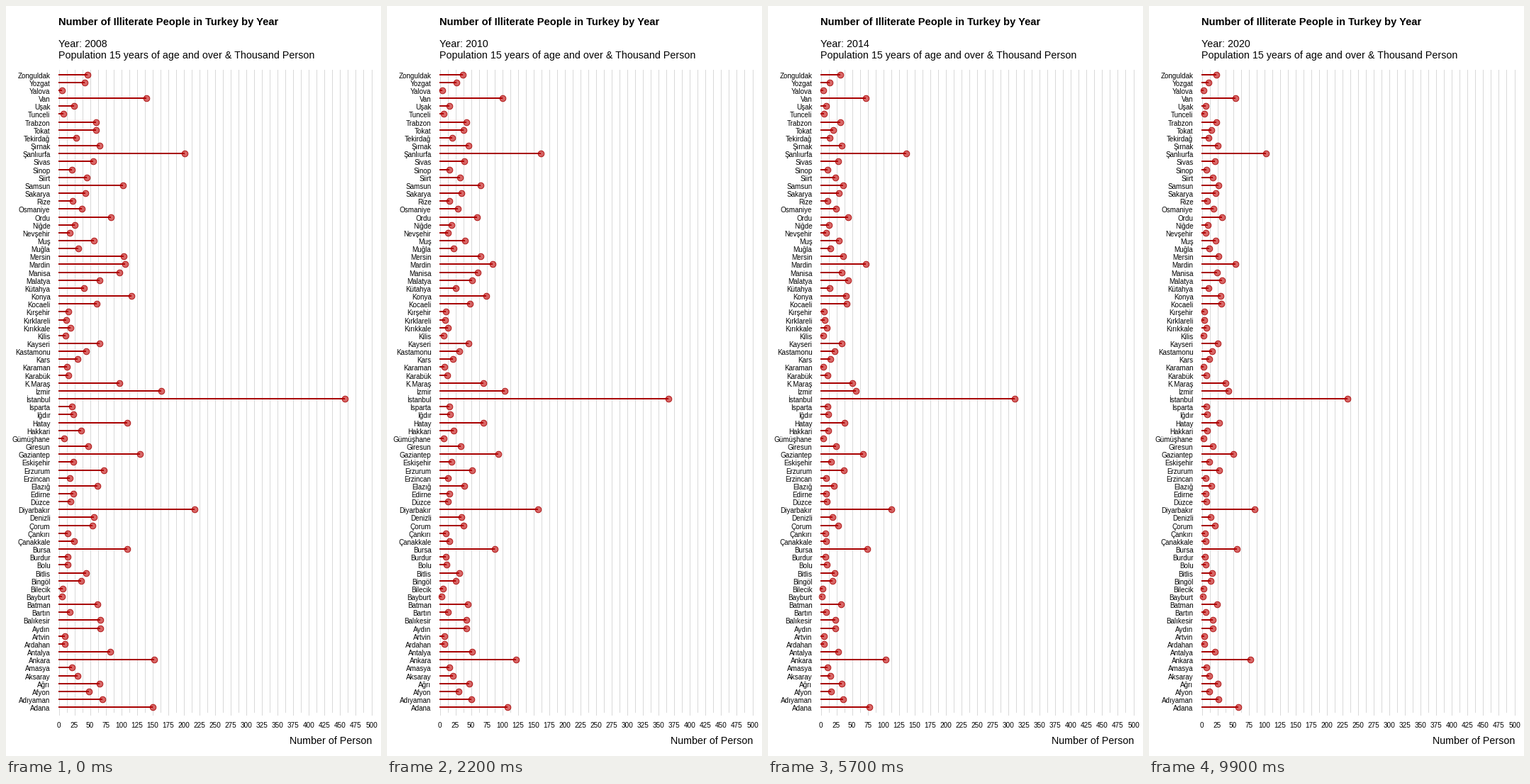
These frames come from a looping animation (529x1058 px, 10000 ms). A matplotlib script:

```python
import numpy as np
import matplotlib.pyplot as plt
from matplotlib.animation import FuncAnimation
from matplotlib.collections import LineCollection

W, H, DPI = 529, 1058, 100
FRAMES, INTERVAL = 100, 100
FIRST_YEAR, YEARS = 2008, 12
X0, UNIT = 74.5, 0.882          # pixel of zero, pixels per thousand people
TOP, ROW = 96.7, 11.156         # first row and row spacing
RED = "#a80000"

# Thousands of people in the first year, top row first
PEOPLE = dict(
    Zonguldak=46, Yozgat=42, Yalova=6, Van=140, Uşak=25, Tunceli=8,
    Trabzon=60, Tokat=60, Tekirdağ=28, Şırnak=65, Şanlıurfa=202, Sivas=55,
    Sinop=21, Siirt=45, Samsun=103, Sakarya=43, Rize=22, Osmaniye=37,
    Ordu=84, Niğde=26, Nevşehir=18, Muş=57, Muğla=31, Mersin=104,
    Mardin=106, Manisa=97, Malatya=65, Kütahya=41, Konya=117, Kocaeli=61,
    Kırşehir=16, Kırklareli=12, Kırıkkale=19, Kilis=11, Kayseri=65,
    Kastamonu=44, Kars=30, Karaman=13, Karabük=16, K_Maraş=97, İzmir=164,
    İstanbul=458, Isparta=21, Iğdır=24, Hatay=110, Hakkari=36, Gümüşhane=9,
    Giresun=47, Gaziantep=130, Eskişehir=24, Erzurum=72, Erzincan=18,
    Elazığ=62, Edirne=24, Düzce=19, Diyarbakır=218, Denizli=56, Çorum=54,
    Çankırı=14, Çanakkale=25, Bursa=110, Burdur=14, Bolu=14, Bitlis=44,
    Bingöl=36, Bilecik=7, Bayburt=5, Batman=62, Bartın=18, Balıkesir=67,
    Aydın=67, Artvin=10, Ardahan=10, Antalya=82, Ankara=153, Amasya=21,
    Aksaray=30, Ağrı=66, Afyon=48, Adıyaman=70, Adana=151)

# Cities that fall less or more than the rest
SLOW = """Zonguldak Yalova Tunceli Şanlıurfa Sakarya Osmaniye Mardin Malatya
Kocaeli Karabük İstanbul Eskişehir Bursa Bolu Ankara""".split()
FAST = """Yozgat Uşak Tokat Samsun Mersin Manisa Kütahya Konya Kırşehir Kilis
Karaman İzmir Hatay Hakkari Elazığ Edirne Denizli Çanakkale Balıkesir Aydın
Antalya Afyon""".split()


def share(name):
    """Part of the first value that is left in the last year."""
    return 0.51 if name in SLOW else 0.26 if name in FAST else 0.39


def remaining(frame, kept):
    """Steep fall at first, a flat stretch, then a steady decline."""
    times = [0, 14, 30, 41, 57, 99]
    mid, late = 0.2 + 1.03 * kept, 1.33 * kept
    points = [1, 0.72 + 0.3 * kept, mid, mid + 0.7 * (late - mid), late, kept]
    return np.interp(frame, times, points)


def pt(px):
    return px * 72 / DPI


plt.rcParams["font.family"] = "Liberation Sans"
fig = plt.figure(figsize=(W / DPI, H / DPI), dpi=DPI, facecolor="white")
ax = fig.add_axes([0, 0, 1, 1])
ax.set_xlim(0, W)
ax.set_ylim(H, 0)
ax.axis("off")


def label(x, y, s, px, **kw):
    return ax.text(x, y, s, fontsize=pt(px), va="baseline", color="black", **kw)


for v in np.arange(0, 501, 12.5):
    x, major = X0 + UNIT * v, v % 25 == 0
    ax.plot([x, x], [90, 1000 if major else 996], color="#d9d9d9", lw=pt(1), zorder=1)
    if major:
        label(x, 1018, f"{v:.0f}", 10, ha="center")

rows = np.round(TOP + ROW * np.arange(len(PEOPLE)))
for name, y in zip(PEOPLE, rows):
    label(62.5, y + 5, name.replace("_", "."), 9.9, ha="right")

label(74.5, 27.5, "Number of Illiterate People in Turkey by Year", 14.6, weight="bold")
year = label(74.5, 58, "", 14.25)
label(74.5, 74, "Population 15 years of age and over & Thousand Person", 14.25)
label(516, 1041, "Number of Person", 14.25, ha="right")

stems = LineCollection([], colors=RED, linewidths=pt(2), zorder=2)
ax.add_collection(stems, autolim=False)
dots = ax.scatter(np.full(len(rows), X0), rows, s=pt(8.6) ** 2, zorder=3,
                  facecolors=[(0.75, 0, 0, 0.6)], edgecolors=[(0.66, 0, 0, 0.85)],
                  linewidths=pt(1))


def draw(frame):
    people = [n * remaining(frame, share(name)) for name, n in PEOPLE.items()]
    x = X0 - 0.3 + UNIT * np.array(people)
    stems.set_segments([[(X0 - 0.5, y), (end, y)] for end, y in zip(x, rows)])
    dots.set_offsets(np.column_stack([x, rows]))
    year.set_text(f"Year: {FIRST_YEAR + YEARS * frame // (FRAMES - 1)}")
    return stems, dots, year


anim = FuncAnimation(fig, draw, frames=FRAMES, interval=INTERVAL,
                     init_func=lambda: draw(0), repeat=True, repeat_delay=0)
plt.show()
```
